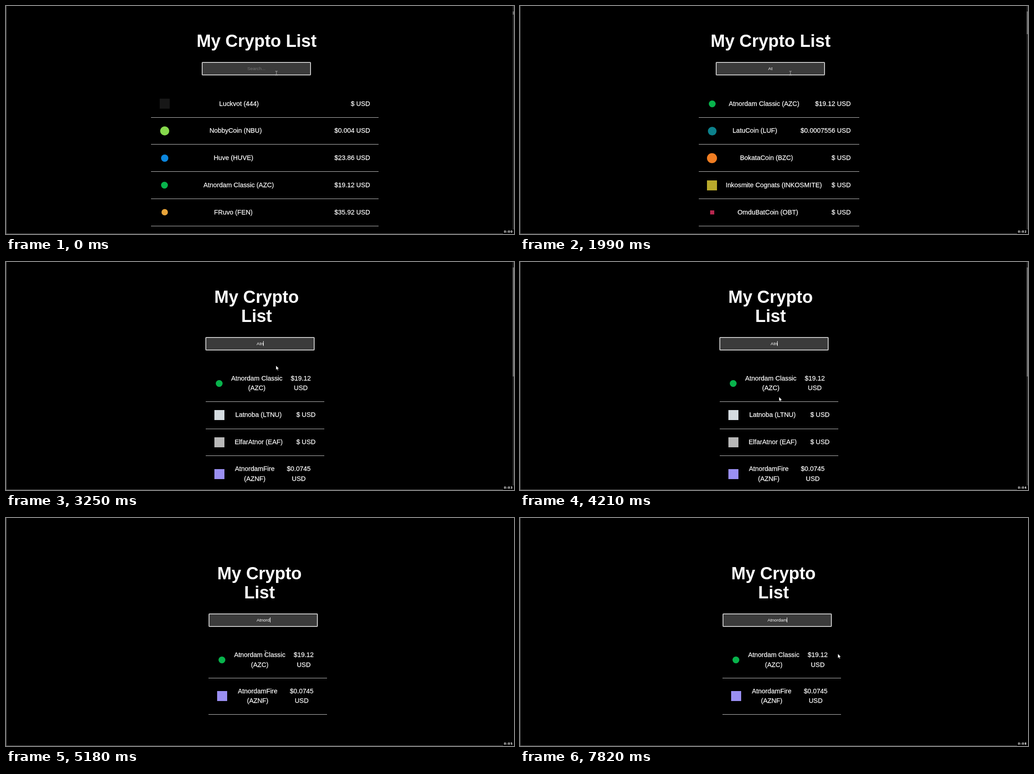
An HTML page that plays this animation: 1114 by 502 pixels, repeating every 8 s.

```html
<!DOCTYPE html>
<html lang="en">
<head>
<meta charset="utf-8">
<title>My Crypto List</title>
<style>
html, body { margin: 0; width: 100%; height: 100%; overflow: hidden; background: #000; }
body { position: relative; color: #fff; font-family: "Liberation Sans", Arial, sans-serif; }
#stage { position: absolute; left: 0; top: 0; width: 1114px; height: 502px; overflow: hidden; }
#stage > *, .scene > * { position: absolute; }
.scene { inset: 0; visibility: hidden; }
.title { transform: translateX(-50%); margin: 0; font-size: 37.9px; line-height: 42px; font-weight: bold; text-align: center; white-space: pre; }
.row { position: relative; box-sizing: border-box; height: 59.75px; padding: 0 18.6px; display: flex; align-items: center; border-bottom: 1px solid #c4c4c4; font-size: 14.35px; line-height: 21.4px; white-space: pre; text-align: center; -webkit-text-stroke: .25px #fff; }
.row.tall { height: 79.7px; }
.tall .text { position: absolute; transform: translateX(-50%); }
.icon { flex: none; width: 22px; height: 22px; display: flex; align-items: center; justify-content: center; }
.near { flex: 1 0 8px; }
.far { flex: 2 0 0px; }
#field { box-sizing: border-box; width: 238px; height: 28px; border: 1px solid #fff; border-radius: 1px; box-shadow: 0 0 0 1px #808080; background: #3b3b3b; font-size: 9.85px; line-height: 25px; text-align: center; }
#typed { position: relative; display: inline-block; min-height: 25px; vertical-align: top; }
#hint { position: absolute; inset: 0; color: #757575; }
#caret { position: absolute; left: 100%; top: 7px; width: 1px; height: 11px; background: #fff; }
#thumb { left: 1111px; top: 12px; width: 3px; background: #6b6b6b; }
#track { left: 1111px; top: 0; width: 3px; height: 502px; background: #2b2b2b; }
#left { left: 0; top: 0; width: 1px; height: 502px; background: #6b6b6b; }
#bottom { left: 0; top: 501px; width: 1114px; height: 1px; background: #5a5a5a; }
#clock { left: 1090px; top: 492px; width: 24px; height: 10px; padding-left: 2px; box-sizing: border-box; background: #000; font: bold 6.4px/10px "DejaVu Sans", sans-serif; letter-spacing: .9px; white-space: nowrap; }
#mouse { left: 0; top: 0; width: 12px; height: 16px; overflow: visible; }
</style>
</head>
<body>
<div id="stage">
  <div id="track"></div><div id="thumb"></div>
  <div id="left"></div><div id="bottom"></div>
  <div id="field"><span id="hint">Search...</span><span id="typed"><span id="word"></span><i id="caret"></i></span></div>
  <svg id="mouse">
    <path id="arrow" d="M0 0V9.5L2.2 7.6L3.8 11L5.3 10.3L3.8 7L6.6 6.8Z" fill="#fff" stroke="#000" stroke-width=".5"/>
    <path id="beam" d="M-2.5 -4.5H-.7L0 -4L.7 -4.5H2.5M0 -4V4M-2.5 4.5H-.7L0 4L.7 4.5H2.5" fill="none" stroke="#b5b5b5" stroke-width="1"/>
  </svg>
  <div id="clock"></div>
</div>
<script>
const $ = id => document.getElementById(id);
const QUERY = 'Atnordam';
const LOOP = 8000;

// name, symbol, price, icon colour, icon size, round icon, text centres when wrapped
const coin = (name, symbol, price, color, size, round, centres) =>
  ({ name, symbol, price, color, size, round, centres });
const classic = coin('Atnordam Classic', 'AZC', '19.12', '#08b34c', 15, true, [112, 208.5]);
const latnoba = coin('Latnoba', 'LTNU', '', '#d5dce0', 22);
const elfar = coin('ElfarAtnor', 'EAF', '', '#b8b8b8', 22);
const fire = coin('AtnordamFire', 'AZNF', '0.0745', '#9a8ff2', 22, false, [107.5, 204]);
const nibor = coin('NiborZatnor', 'NIHZ', '0.02082', '#2b2823', 19, true, [102.5, 199]);

const wide = { left: 318, width: 499, top: 185.9, title: 'My Crypto List', titleAt: [549.5, 55.5], field: [430, 124], thumb: 7 };
const narrow = { left: 438, width: 259.5, top: 228.1, title: 'My Crypto\nList', titleAt: [549.5, 55.5], field: [438, 166], wrap: true };

const scenes = [
  { ...wide, from: 0, rows: [
    coin('Luckvot', '444', '', '#171717', 22),
    coin('NobbyCoin', 'NBU', '0.004', '#86d94c', 20, true),
    coin('Huve', 'HUVE', '23.86', '#0b86dd', 16, true),
    classic,
    coin('FRuvo', 'FEN', '35.92', '#e8a439', 14, true)] },
  { ...wide, from: 700, rows: [
    classic,
    coin('Ravlomint', 'RVU', '', '#3f7fc4', 20, true),
    coin('GulpaCoin', 'GPU', '0.0121', '#d9a22e', 20, true),
    coin('PivalBit', 'PVB', '', '#8a8a8a', 20, true),
    coin('Dolanexu', 'DLX', '', '#4a9c6d', 20, true)] },
  { ...wide, from: 1390, left: 391.8, width: 352.2, thumb: 50, rows: [
    classic,
    coin('LatuCoin', 'LUF', '0.0007556', '#0c818c', 19, true),
    coin('BokataCoin', 'BZC', '', '#f07d22', 22, true),
    coin('Inkosmite Cognats', 'INKOSMITE', '', '#b9aa2c', 22),
    coin('OmduBatCoin', 'OBT', '', '#b8274f', 9)] },
  { ...narrow, from: 2140, thumb: 240, rows: [classic, latnoba, elfar, fire] },
  { ...narrow, from: 5050, thumb: 400, rows: [classic, elfar, fire, nibor] },
  { ...narrow, from: 5180, left: 444.4, top: 273.2, titleAt: [555.9, 101], field: [445, 211], rows: [classic, fire] }
];

const place = (el, x, y) => { el.style.left = x + 'px'; el.style.top = y + 'px'; };
function add(parent, className, text = '') {
  const el = document.createElement('div');
  el.className = className;
  el.textContent = text;
  parent.append(el);
  return el;
}

function addRow(list, c, wrap) {
  const tall = wrap && c.centres;
  const gap = tall ? '\n' : ' ';
  const row = add(list, tall ? 'row tall' : 'row');
  const dot = add(add(row, 'icon'), '');
  dot.style.cssText = `width:${c.size}px;height:${c.size}px;background:${c.color};border-radius:${c.round ? '50%' : 0}`;
  add(row, 'near');
  const name = add(row, 'text', `${c.name}${gap}(${c.symbol})`);
  add(row, 'far');
  const price = add(row, 'text', `$${c.price}${gap}USD`);
  if (tall) [name, price].forEach((el, i) => { el.style.left = c.centres[i] + 'px'; });
}

for (const s of scenes) {
  s.el = add($('stage'), 'scene');
  $('stage').prepend(s.el);
  place(add(s.el, 'title', s.title), ...s.titleAt);
  const list = add(s.el, 'list');
  place(list, s.left, s.top);
  list.style.width = s.width + 'px';
  s.rows.forEach(c => addRow(list, c, s.wrap));
}

const keyTimes = [700, 1390, 2140, 4620, 5050, 5180, 5340, 5490];
const secondTimes = [990, 1990, 2980, 3930, 4920, 5900, 6880, 7820];
const caretOff = [[0, 290], [1250, 1390], [1970, 2140], [2690, 3220], [3720, 4210], [6050, 6600], [7130, 7660]];
// time, x, y, shape
const mouseSteps = [
  [0, 593, 148, 'beam'], [2140, 592, 148, 'arrow'], [3110, 592, 176, 'arrow'],
  [3250, 592, 228, 'arrow'], [3380, 592, 275, 'arrow'], [3510, 592, 299, 'arrow'],
  [3650, 578, 298, 'arrow'], [3780, 568, 297, 'arrow'], [5050, 569, 297, 'beam'],
  [6330, 645, 297, 'beam'], [6460, 721, 342, 'arrow'], [6730, 717, 398, 'arrow'],
  [6880, 705, 414, 'arrow'], [7020, 690, 412, 'arrow'], [7160, 682, 390, 'arrow'],
  [7290, 684, 360, 'arrow'], [7430, 690, 325, 'arrow'], [7560, 697, 299, 'arrow']
];
const passed = (times, t) => times.filter(k => k <= t).length;
const show = (el, on) => { el.style.display = on ? '' : 'none'; };

function draw(now) {
  const t = now % LOOP;
  const scene = scenes.findLast(s => s.from <= t);
  for (const s of scenes) s.el.style.visibility = s === scene ? 'visible' : 'hidden';
  place($('field'), ...scene.field);
  show($('track'), scene.thumb);
  show($('thumb'), scene.thumb);
  $('thumb').style.height = (scene.thumb || 0) + 'px';

  const word = QUERY.slice(0, passed(keyTimes, t));
  $('word').textContent = word;
  show($('hint'), !word);
  show($('caret'), !caretOff.some(([a, b]) => t >= a && t < b));
  $('clock').textContent = '0:0' + passed(secondTimes, t);

  const [, x, y, shape] = mouseSteps.findLast(m => m[0] <= t);
  place($('mouse'), x, y);
  for (const id of ['arrow', 'beam']) show($(id), id === shape);
}

const start = performance.now();
function tick() {
  draw(performance.now() - start);
  requestAnimationFrame(tick);
}
tick();
</script>
</body>
</html>
```
